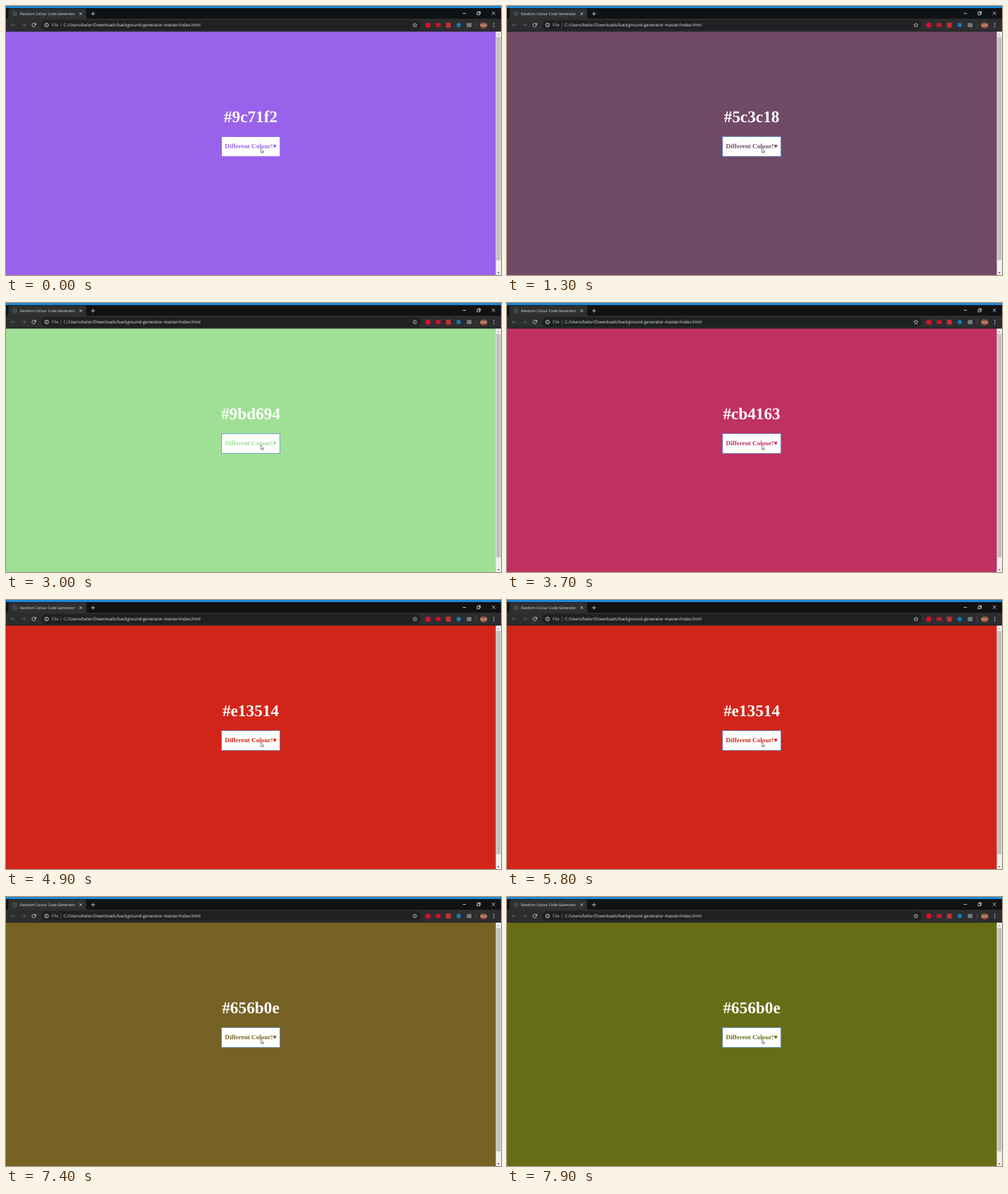
These frames come from a looping animation (704 px wide and 382 px high, 8000 ms). An HTML page:

```html
<!DOCTYPE html>
<html lang="en">
<head>
<meta charset="utf-8">
<title>Random Colour Code Generator</title>
<style>
  html, body { margin: 0; width: 100%; height: 100%; overflow: hidden; background: #111; }
  svg { display: block; width: 100%; height: 100%; }
  text { text-rendering: geometricPrecision; }
  .ui { font-family: "Open Sans", "Noto Sans", sans-serif; fill: #e6e6e6; }
  .page { font-family: "Liberation Serif", "Times New Roman", serif; font-weight: bold; text-anchor: middle; }
  .line { fill: none; stroke: #e4e4e4; stroke-width: .8; }
  .dim { stroke: #66686b; }
</style>
</head>
<body>
<svg id="stage" viewBox="0 0 704 382" preserveAspectRatio="none">
  <defs>
    <linearGradient id="avatar" x2="0" y2="1">
      <stop offset="0" stop-color="#3a2a26"/>
      <stop offset=".5" stop-color="#c8876a"/>
      <stop offset="1" stop-color="#6b2f25"/>
    </linearGradient>
  </defs>

  <!-- Page -->
  <rect y="36" width="697" height="346" fill="currentColor"/>
  <text id="code" class="page" x="348" y="164.6" font-size="23.3" fill="#fff"></text>
  <rect x="307" y="186" width="82.3" height="27.3" fill="#fff"/>
  <rect id="ring" x="306.6" y="185.6" width="83" height="28" fill="none" stroke="#6f9bd0" stroke-width=".9"/>
  <text class="page" x="348.2" y="202.3" font-size="9.17" fill="currentColor">Different Colour!♥</text>
  <path d="M362.5 201.8v6.3l1.4-1.2 1 2.2 1-.5-1-2.1h1.9z" fill="#fff" stroke="#333" stroke-width=".55"/>

  <!-- Scrollbar -->
  <rect x="696.6" y="36" width="7.4" height="346" fill="#f1f1f1"/>
  <rect x="697.4" y="43.8" width="5.9" height="317.4" fill="#c1c1c1"/>
  <path d="M698.6 41.3l1.7-1.9 1.7 1.9z" fill="#8a8a8a"/>
  <path d="M698.6 378l1.7 1.9 1.7-1.9z" fill="#505050"/>

  <!-- Title bar and tab -->
  <rect width="704" height="18" fill="#111213"/>
  <rect width="704" height="3" fill="#1c87d6"/>
  <path d="M1 18q2.5 0 2.5-2.5V6Q3.500 3.500 6 3.500H111.500Q114 3.500 114 6V15.500Q114 18 116.500 18z" fill="#2f3032"/>
  <circle class="line" cx="12.500" cy="11" r="2.700" style="stroke:#6c6e70"/>
  <path class="line" d="M10.600 9.200l3.800 3.600" style="stroke:#6c6e70"/>
  <text class="ui" x="20" y="13" font-size="5.220">Random Colour Code Generator</text>
  <path class="line" d="M104.500 9.200l3.600 3.600m0-3.600l-3.600 3.600M121 11h5.600m-2.800-2.800v5.600"/>
  <path class="line" d="M649.600 10.500h4.600M670 9h3.600v3.600H670zm1-1h3.600v3.600M691 8l4.600 4.600m0-4.600L691 12.600"/>

  <!-- Toolbar -->
  <rect y="18" width="704" height="18.200" fill="#2c2d2f"/>
  <rect y="35.300" width="704" height=".9" fill="#1b1c1d"/>
  <rect x="50" y="20" width="540" height="14" rx="7" fill="#1f2022"/>
  <path class="line dim" d="M13.400 27H7.300m2.800-2.800L7.300 27l2.800 2.800M22 27h6.100m-2.800-2.800l2.800 2.800-2.800 2.800"/>
  <path class="line" d="M41.600 25.300a2.600 2.600 0 1 0 .5 2.400"/>
  <path d="M42.700 23.900v2.900h-2.900z" fill="#e4e4e4"/>
  <circle class="line" cx="57.700" cy="27" r="2.700"/>
  <path class="line" d="M57.700 26.600v1.900m0-3.500v.8"/>
  <text class="ui" x="65" y="29.200" font-size="6.100" style="fill:#b9bbbe">File</text>
  <path class="line dim" d="M78.300 23.500v7"/>
  <text class="ui" x="82" y="29.200" font-size="6.080">C:/Users/belor/Downloads/background-generator-master/index.html</text>
  <path id="star" class="line" style="stroke-width:.6"/>
  <circle cx="600" cy="27.200" r="3.800" fill="#d3122b"/>
  <rect x="611" y="24.300" width="7" height="5.400" fill="#c5162e"/>
  <rect x="625.800" y="23.700" width="6.600" height="7" fill="#c9302f"/>
  <circle cx="643.800" cy="27.100" r="3.100" fill="#1b76b8"/>
  <rect x="655.400" y="24.200" width="6.600" height="5.800" fill="#77797b"/>
  <path class="line dim" d="M669 23.200v7.600" style="stroke-width:.5"/>
  <circle cx="679.300" cy="27.200" r="5" fill="url(#avatar)"/>
  <g fill="#e4e4e4">
    <circle cx="693.800" cy="24.800" r=".7"/>
    <circle cx="693.800" cy="27.100" r=".7"/>
    <circle cx="693.800" cy="29.400" r=".7"/>
  </g>
</svg>
<script>
const LOOP = 8000, FADE = 600;
// Click time, heading, colour as it appears on screen
const picks = [
  [-FADE, '#9c71f2', 0x9962ea],
  [1080, '#5c3c18', 0x593b1a],
  [2260, '#9bd694', 0xa0e096],
  [3120, '#cb4163', 0xbf3162],
  [4220, '#e13514', 0xd2251a],
  [5820, '#ba4b5e', 0xb03c5b],
  [7120, '#656b0e', 0x666e15]
];
const $ = id => document.getElementById(id);
const stage = $('stage'), code = $('code'), ring = $('ring');

const points = Array.from({ length: 10 }, (_, i) => {
  const r = i % 2 ? 1.4 : 3.3, a = (i / 5 - .5) * Math.PI;
  return `${581.5 + r * Math.cos(a)} ${27.2 + r * Math.sin(a)}`;
});
$('star').setAttribute('d', `M${points.join('L')}z`);

const bezier = (s, a, b) => 3 * s * (1 - s) ** 2 * a + 3 * s * s * (1 - s) * b + s ** 3;

// CSS "ease": cubic-bezier(.25, .1, .25, 1)
function ease(x) {
  if (x >= 1) return 1;
  let low = 0, high = 1;
  for (let i = 0; i < 24; i++) {
    const mid = (low + high) / 2;
    if (bezier(mid, .25, .25) < x) low = mid; else high = mid;
  }
  return bezier(low, .1, 1);
}

function mix(from, to, k) {
  const channels = [16, 8, 0].map(shift => {
    const a = from >> shift & 255, b = to >> shift & 255;
    return Math.round(a + (b - a) * k);
  });
  return `rgb(${channels})`;
}

function draw() {
  const t = performance.now() % LOOP;
  const index = picks.findLastIndex(([start]) => start <= t);
  const [start, name, colour] = picks[index];
  const previous = picks[Math.max(0, index - 1)][2];
  stage.style.color = mix(previous, colour, ease((t - start) / FADE));
  if (code.textContent !== name) code.textContent = name;
  ring.style.opacity = t < 100 ? 0 : 1;
  requestAnimationFrame(draw);
}
draw();
</script>
</body>
</html>
```
